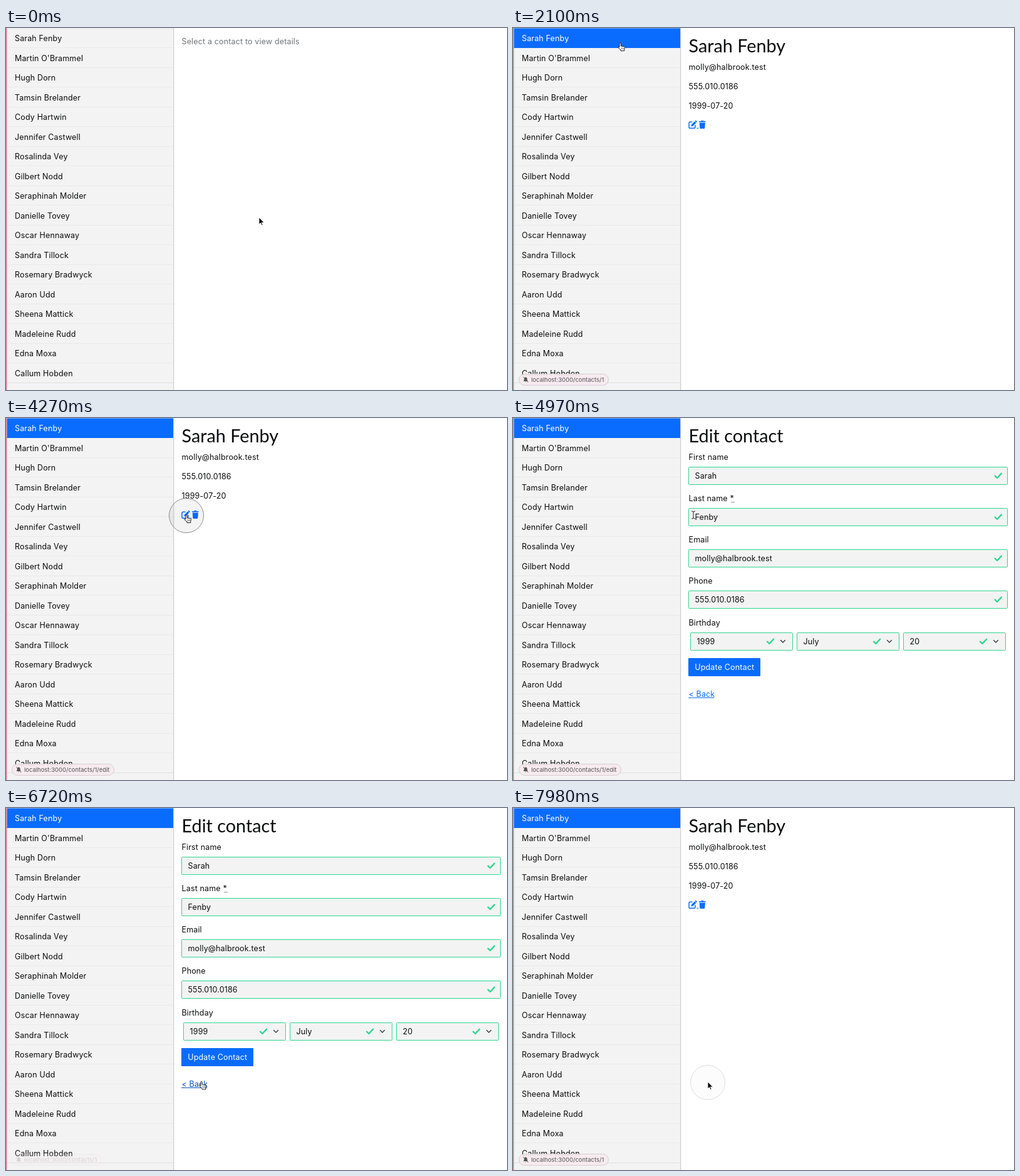
These frames come from a looping animation (800 px wide and 579 px high, 8000 ms). An HTML page:

```html
<!DOCTYPE html>
<html lang="en">
<head>
<meta charset="utf-8">
<title>Contacts</title>
<style>
  html, body { margin: 0; width: 100%; height: 100%; overflow: hidden; background: #fff; }
  svg { display: block; width: 100vw; height: 100vh; cursor: default; }
  text { font: 12.5px Inter, "Open Sans", sans-serif; letter-spacing: .15px; fill: #0c0d0e; white-space: pre; }
  .title { font: 28.8px Lato, "Open Sans", sans-serif; letter-spacing: 0; }
  .status { font: 500 9.3px Inter, sans-serif; letter-spacing: 0; fill: #68666a; }
  .muted { fill: #70757a; }
  .light { fill: #fff; }
  .link { fill: #0a6cff; }
  .line { fill: none; stroke-linecap: round; stroke-linejoin: round; }
</style>
</head>
<body>
<svg id="stage" viewBox="0 0 800 579" preserveAspectRatio="none"></svg>
<script>
const LOOP = 8000, STEP = 70, ROW = 31.5, BLUE = '#0a6cff', GREEN = '#2fd58f';
const people = [
  'Sarah Fenby', "Martin O'Brammel", 'Hugh Dorn', 'Tamsin Brelander', 'Cody Hartwin',
  'Jennifer Castwell', 'Rosalinda Vey', 'Gilbert Nodd', 'Seraphinah Molder', 'Danielle Tovey',
  'Oscar Hennaway', 'Sandra Tillock', 'Rosemary Bradwyck', 'Aaron Udd', 'Sheena Mattick',
  'Madeleine Rudd', 'Edna Moxa', 'Callum Hobden'
];
const [first, last] = people[0].split(' ');
const email = 'molly@halbrook.test', phone = '555.010.0186', born = '1999-07-20';

const text = (x, y, str, cls = '') =>
  `<text x="${x}" y="${y}" class="${cls}">${str.replace('<', '&lt;')}</text>`;
const rect = (x, y, w, h, fill, more = '') =>
  `<rect x="${x}" y="${y}" width="${w}" height="${h}" fill="${fill}" ${more}/>`;
const line = (d, stroke, width = 1) =>
  `<path class="line" d="${d}" stroke="${stroke}" stroke-width="${width}"/>`;
const group = (id, body) => `<g id="${id}">${body}</g>`;

const box = (x, y, w) => rect(x + .5, y + .5, w - 1, 28, '#f3f3f3', `stroke="${GREEN}" rx="1"`);
const check = (x, y) => line(`M${x - 5} ${y + .3}l3.4 3.4 6.8-7.4`, GREEN, 2.3);

function field(label, value, y) {
  return text(280.5, y, label) + box(280, y + 11, 510) + text(290.5, y + 30, value) + check(774.7, y + 25.3);
}
function choice(value, x) {
  return box(x, 343, 164) + text(x + 10.5, 362, value) + check(x + 128, 357.3)
    + line(`M${x + 144.5} 355.5l3.5 3.5 3.5-3.5`, '#343a40', 1.4);
}

function sidebar() {
  const rows = people.map((name, i) => {
    const y = .5 + i * ROW;
    return rect(1.5, y, 265.5, ROW, '#f3f3f3', `id="row${i}"`)
      + line(`M1.5 ${y + ROW}H267`, '#dfe0e1') + text(14, y + 20.5, name);
  }).join('');
  return rect(0, 0, 268, 579, '#f3f3f3') + line('M1.5 .5H267', '#dfe0e1') + rows
    + rect(0, 0, 1.4, 579, '#d98191') + rect(267, 0, 1, 579, '#cfd0d1') + rect(268, 0, 1, 579, '#f0f0f0');
}

const emptyView = text(280.5, 26, 'Select a contact to view details', 'muted');

const detailView = text(280.5, 39, people[0], 'title')
  + text(280.5, 67, email) + text(280.5, 98, phone) + text(280.5, 129, born)
  + line('M286 150.3h-3.2q-1.8 0-1.8 1.8v6.3q0 1.8 1.8 1.8h6.3q1.8 0 1.8-1.8v-3', BLUE, 1.5)
  + `<path fill="${BLUE}" d="M284.4 157.4l.6-3 5-5 2.4 2.4-5 5zM290.5 148.8l.8-.7q.6-.4 1.2.2l1 1q.5.6 0 1.2l-.7.7z"/>`
  + line('M293.5 160.3h2.5', BLUE)
  + `<path fill="${BLUE}" d="M297 149h3l.6-1h3.4l.6 1h3v1.6h-10.600zM297.700 151.500h9.200l-.6 8.200q-.1 1.200-1.300 1.200h-5.400q-1.200 0-1.300-1.200z"/>`;

const formView = text(280.5, 39, 'Edit contact', 'title')
  + field('First name', first, 67) + field('Last name *', last, 133)
  + '<path d="M348.500 134.700h6" stroke="#222" stroke-dasharray="1 1"/>'
  + field('Email', email, 199) + field('Phone', phone, 265)
  + text(280.5, 331.5, 'Birthday') + choice('1999', 283) + choice('July', 453) + choice('20', 623)
  + rect(280, 384, 115, 29, BLUE, 'rx="1" id="save"') + text(290.3, 403, 'Update Contact', 'light')
  + group('back', text(280.5, 445.500, '< Back', 'link') + line('M280.500 447.500H321', 'currentColor'));

const status = rect(9.5, 553.5, 143, 18, '#f8ebef', 'id="pill" rx="9" fill-opacity=".93" stroke="#d9cdd1"')
  + '<path fill="#555" d="M16.500 565q1.200-1 1.200-3 0-3.200 2.500-3.500 2.500.3 2.500 3.500 0 2 1.200 3zM19 565.700h2.400q-1.200 1.600-2.400 0z"/>'
  + line('M16.500 558.500l7.500 8', '#555') + '<text id="url" class="status" x="29" y="566"></text>';

const cursors = {
  arrow: '<path d="M0 0V11L2.600 8.700 4.300 12.600 6 11.900 4.300 8.200H8Z" fill="#000" stroke="#fff" stroke-width=".8"/>',
  hand: '<path d="M-1 7V.9a1.100 1.100 0 0 1 2.200 0V4.800L6.500 5.800Q7.600 6.100 7.500 7.300L6.800 10.500V12.500H1V11L-3 7.600Q-3.600 6.400-2.400 6.200Z" fill="#fff" stroke="#222" stroke-linejoin="round"/>'
    + line('M2 7.500v2.600M4 7.500v2.600M5.800 7.700v2.300', '#444', .7),
  beam: line('M-2.500-6Q0-6 0-4.500V4.500Q0 6-2.500 6M2.500-6Q0-6 0-4.500M0 4.500Q0 6 2.500 6', '#222')
};

const stage = document.getElementById('stage');
stage.innerHTML = rect(0, 0, 800, 579, '#fff') + sidebar()
  + group('empty', emptyView) + group('detail', detailView) + group('form', formView)
  + group('status', status)
  + '<circle id="ripple" r="27.500" fill="#000" fill-opacity=".05" stroke="#777"/>'
  + group('pointer', Object.entries(cursors).map(([id, body]) => group(id, body)).join(''));
const el = id => document.getElementById(id);
const show = (id, on) => el(id).style.display = on ? '' : 'none';

// time, x, y
const path = [
  [70, 404, 303], [490, 171, 24], [2520, 171, 24], [2590, 280, 95], [2800, 280, 95],
  [3010, 316, 163], [3150, 316, 163], [3430, 290, 157], [3570, 290, 157], [3710, 288, 155],
  [4970, 288, 155], [5460, 420, 270], [5740, 420, 270], [5950, 405, 420], [6160, 405, 420],
  [6440, 312, 437.500], [7490, 312, 437.500], [7630, 311, 438]
];
// time, view
const views = [[0, 'empty'], [1960, 'detail'], [4410, 'form'], [7630, 'detail']];
// fade in from/to, fade out from/to, address
const hints = [
  [980, 1400, 2520, 2590, '1'], [3990, 4200, 5040, 5320, '1/edit'], [6720, 7000, 9000, 9100, '1']
];
// start, end
const clicks = [[1680, 2030], [4200, 4690], [7350, 8200]];

const ramp = (t, a, b) => Math.min(1, Math.max(0, (t - a) / (b - a)));
const inside = (x, y, l, t, r, b) => x >= l && x <= r && y >= t && y <= b;

function pointerAt(t) {
  const i = path.findIndex(p => p[0] > t);
  if (i <= 0) return (i ? path.at(-1) : path[0]).slice(1);
  const [a, b] = [path[i - 1], path[i]], k = ramp(t, a[0], b[0]), e = k * k * (3 - 2 * k);
  return [a[1] + (b[1] - a[1]) * e, a[2] + (b[2] - a[2]) * e];
}

function draw(t) {
  const view = views.findLast(v => v[0] <= t)[1], [x, y] = pointerAt(t);
  ['empty', 'detail', 'form'].forEach(id => show(id, id === view));

  const over = x < 267 ? Math.floor((y - .5) / ROW) : -1;
  people.forEach((_, i) => {
    const active = i === 0 && view !== 'empty';
    el('row' + i).setAttribute('fill', active ? BLUE : i === over ? '#fff' : '#f3f3f3');
  });
  const top = el('row0').nextElementSibling;
  top.setAttribute('stroke', view === 'empty' ? '#dfe0e1' : BLUE);
  top.nextElementSibling.setAttribute('class', view === 'empty' ? '' : 'light');

  const form = view === 'form';
  const onBack = form && inside(x, y, 280, 430, 321, 450);
  const onSave = form && inside(x, y, 280, 384, 395, 413);
  const onIcon = view === 'detail' && inside(x, y, 280, 148, 308, 162);
  const onInput = form && inside(x, y, 280, 78, 790, 306) && (y - 78) % 66 < 29;
  el('back').style.color = el('back').firstChild.style.fill = onBack ? '#0a53be' : BLUE;
  el('save').setAttribute('fill', onSave ? '#0b5ed7' : BLUE);

  const kind = over >= 0 || onBack || onSave || onIcon ? 'hand' : onInput ? 'beam' : 'arrow';
  Object.keys(cursors).forEach(id => show(id, id === kind));
  el('pointer').setAttribute('transform', `translate(${x} ${y})`);

  const hint = hints.find(h => t >= h[0] && t < h[3]);
  show('status', hint);
  if (hint) {
    el('status').style.opacity = ramp(t, hint[0] - STEP, hint[1]) * (1 - ramp(t, hint[2], hint[3]));
    el('url').textContent = 'localhost:3000/contacts/' + hint[4];
    el('pill').setAttribute('width', hint[4] === '1' ? 143 : 163);
  }

  const click = clicks.find(c => t >= c[0] && t < c[1]);
  show('ripple', click);
  if (click) {
    el('ripple').setAttribute('transform', `translate(${x} ${y + 1})`);
    el('ripple').style.opacity = 1 - ramp(t, ...click);
  }
}

function tick() {
  const t = performance.now() % LOOP;
  draw(Math.floor(t / STEP) * STEP);
  requestAnimationFrame(tick);
}
tick();
</script>
</body>
</html>
```
